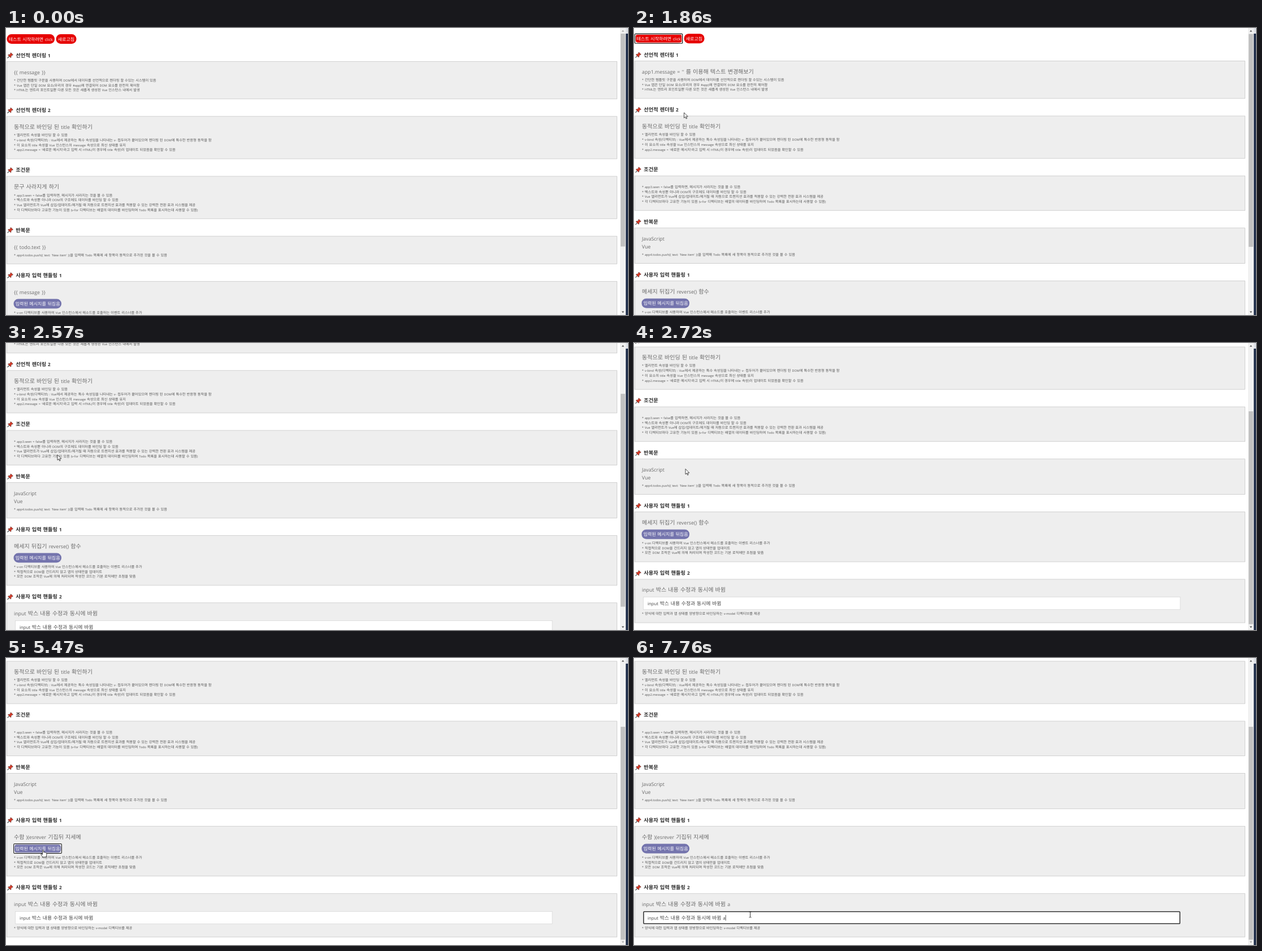
Write an HTML page that moves like this. It is 1100 px wide and 509 px high and loops after 7990 ms.

```html
<!DOCTYPE html>
<html lang="ko">
<head>
<meta charset="utf-8">
<title>Vue 연습</title>
<style>
  html, body { margin: 0; width: 100%; height: 100%; overflow: hidden; background: #fff; }
  svg { display: block; width: 1100px; height: 509px; }
  text {
    font-family: "Open Sans", "Noto Sans CJK KR", sans-serif;
    word-spacing: .1em; white-space: pre; text-rendering: geometricPrecision;
  }
  .ko { font-family: "Noto Sans CJK KR", sans-serif; font-size: 1.14em; }
  .title { font-size: 8.1px; font-weight: 700; fill: #2a2a2a; }
  .head { font-size: 8.8px; fill: #6a6a6a; }
  .note { font-size: 5.46px; fill: #555; }
  .btn { font-size: 7.05px; fill: #fff; }
  .field { font-size: 7.75px; fill: #444; }
  .box { fill: #eee; stroke: #c8c8c8; stroke-width: .8; }
  .ring { fill: none; stroke: #101010; stroke-width: 1.3; }
  .gap { fill: none; stroke: #fff; stroke-width: .9; }
  .pin { fill: #d93a28; stroke: #3a1512; stroke-width: .6; }
  .needle { stroke: #444; stroke-width: 1.1; }
  .cursor path { fill: #fff; stroke: #111; stroke-width: .75; stroke-linejoin: round; }
  .cursor .beam { fill: none; stroke: #222; stroke-width: .9; }
</style>
</head>
<body>
<svg viewBox="0 0 1100 509">
  <g id="page"></g>
  <rect x="1086" width="10" height="509" fill="#f1f1f1"/>
  <rect id="thumb" x="1087" y="10" width="8" height="377.5" fill="#c1c1c1"/>
  <path id="up" d="M1088.8 6.4L1091 3.8 1093.2 6.4Z"/>
  <path id="down" d="M1088.8 502.6L1091 505.2 1093.2 502.6Z"/>
  <rect x="1096" width="4" height="10" fill="#dfe2e8"/>
  <rect x="1096" y="10" width="4" height="499" fill="#26344f"/>
  <g id="cursor" class="cursor">
    <path id="arrow" d="M0 0V9.6L2.2 7.5 3.7 11 5.2 10.3 3.7 7H6.8Z"/>
    <path id="hand" d="M-1 1Q0 -.4 1 1V4.6Q2.2 3.9 3 5 4.3 4.4 5 5.6 6 5.2 6.3 6.5V9.5L5.2 13H-.8L-3.6 8.6Q-4 7.2 -2.6 7.4L-1 8.8Z"/>
    <path id="beam" class="beam" d="M-2 -5H-.6L0 -4.5 .6 -5H2M0 -4.5V4.5M-2 5H-.6L0 4.5 .6 5H2"/>
  </g>
</svg>
<script>
const LOOP = 7990;
const MAX_SCROLL = 151;
const $ = id => document.getElementById(id);
const show = (id, on) => { $(id).style.display = on ? '' : 'none'; };

// Hangul runs get their own, slightly larger face.
const mixed = s => s.replace(/[가-힣]+/g, run => `<tspan class="ko">${run}</tspan>`);
const lift = { title: 3.3, head: 3.5, note: 2.1, btn: 2.9, field: 2.9 };
const label = (cls, x, middle, s, id = '') =>
  `<text id="${id}" class="${cls}" x="${x}" y="${middle + lift[cls]}">${mixed(s)}</text>`;
const pill = (x, y, w, color, s) =>
  `<rect x="${x}" y="${y}" width="${w}" height="17" rx="8.2" fill="${color}"/>` +
  label('btn', x + 3.2, y + 8.7, s);
const focusRing = (id, x, y, w, h) =>
  `<g id="${id}"><rect class="ring" x="${x}" y="${y}" width="${w}" height="${h}" rx="1.2"/>` +
  `<rect class="gap" x="${x + 1.1}" y="${y + 1.1}" width="${w - 2.2}" height="${h - 2.2}"/></g>`;
const pin = y => `<g transform="translate(2 ${y - 5.3})"><path class="needle" d="M.5 10.5L4 7"/>` +
  '<path class="pin" d="M6.5 .8L10.3 4.6 9.6 5.3 8.8 5 6.9 7 7 9 6.2 9.6 1.6 5 2.3 4.2 4.2 4.3 6.2 2.4 5.9 1.5Z"/></g>';

const REVERSE = '메세지 뒤집기 reverse() 함수';
const TYPED = 'input 박스 내용 수정과 동시에 바뀜';
const sections = [
  { title: '선언적 렌더링 1', before: ['{{ message }}'], after: ["app1.message = '' 를 이용해 텍스트 변경해보기"],
    notes: ['간단한 템플릿 구문을 사용하여 DOM에서 데이터를 선언적으로 렌더링 할 수있는 시스템이 있음',
      'Vue 앱은 단일 DOM 요소(우리의 경우 #app)에 연결되어 DOM 요소를 완전히 제어함',
      'HTML는 엔트리 포인트일뿐 다른 모든 것은 새롭게 생성된 Vue 인스턴스 내에서 발생'] },
  { title: '선언적 렌더링 2', before: ['동적으로 바인딩 된 title 확인하기'], after: ['동적으로 바인딩 된 title 확인하기'],
    notes: ['엘리먼트 속성을 바인딩 할 수 있음',
      'v-bind 속성(디렉티브) : Vue에서 제공하는 특수 속성임을 나타내는 v- 접두어가 붙어있으며 렌더링 된 DOM에 특수한 반응형 동작을 함',
      '이 요소의 title 속성을 Vue 인스턴스의 message 속성으로 최신 상태를 유지',
      "app2.message = '새로운 메시지'라고 입력 시 HTML(이 경우에 title 속성)이 업데이트 되었음을 확인할 수 있음"] },
  { title: '조건문', before: ['문구 사라지게 하기'], after: [],
    notes: ['app3.seen = false를 입력하면, 메시지가 사라지는 것을 볼 수 있음',
      '텍스트와 속성뿐 아니라 DOM의 구조에도 데이터를 바인딩 할 수 있음',
      'Vue 엘리먼트가 Vue에 삽입/업데이트/제거될 때 자동으로 트랜지션 효과를 적용할 수 있는 강력한 전환 효과 시스템을 제공',
      '각 디렉티브마다 고유한 기능이 있음 (v-for 디렉티브는 배열의 데이터를 바인딩하여 Todo 목록을 표시하는데 사용할 수 있음)'] },
  { title: '반복문', before: ['{{ todo.text }}'], after: ['JavaScript', 'Vue'],
    notes: ["app4.todos.push({ text: 'New item' })을 입력해 Todo 목록에 새 항목이 동적으로 추가된 것을 볼 수 있음"] },
  { title: '사용자 입력 핸들링 1', before: ['{{ message }}'], after: [REVERSE], id: 'reversible', extra: 22,
    widget: (y, live) => pill(13.5, y + 31.2, 84.5, '#7474ad', '입력된 메시지를 뒤집음') +
      (live ? focusRing('flipFocus', 13.8, y + 31.4, 84.4, 16.6) : ''),
    notes: ['v-on 디렉티브를 사용하여 Vue 인스턴스에서 메소드를 호출하는 이벤트 리스너를 추가',
      '직접적으로 DOM을 건드리지 않고 앱의 상태만을 업데이트',
      '모든 DOM 조작은 Vue에 의해 처리되며 작성한 코드는 기본 로직에만 초점을 맞춤'] },
  { title: '사용자 입력 핸들링 2', before: ['{{ message }}'], after: [TYPED], id: 'echo', extra: 28,
    widget: (y, live) => `<rect x="16.5" y="${y + 31.6}" width="949.5" height="22.2" fill="#fff" stroke="#d4d4d4" stroke-width=".7"/>` +
      (live ? label('field', 24, y + 43.2, TYPED, 'field') +
        `<rect id="fieldFocus" class="ring" x="17" y="${y + 32.1}" width="948.4" height="21.2" rx="1.2"/>` +
        `<rect id="caret" y="${y + 38}" width=".7" height="10" fill="#111"/>` : ''),
    notes: ['양식에 대한 입력과 앱 상태를 양방향으로 바인딩하는 v-model 디렉티브를 제공'] }
];

function layout(live) {
  let y = 59.3, out = '';
  for (const s of sections) {
    const heads = live ? s.after : s.before;
    const extra = s.extra || 0;
    const height = 26.7 + 13.7 * heads.length + 8.7 * s.notes.length + extra;
    out += pin(y - 11) + label('title', 17.3, y - 11, s.title) +
      `<rect class="box" x="1.5" y="${y}" width="1079" height="${height}"/>`;
    heads.forEach((h, i) => out += label('head', 14, y + 18.8 + 13.7 * i, h, live && s.id || ''));
    if (s.widget) out += s.widget(y, live);
    s.notes.forEach((n, i) =>
      out += label('note', 14, y + 19.7 + 13.7 * heads.length + extra + 8.7 * i, '* ' + n));
    y += height + 31;
  }
  return out;
}

$('page').innerHTML =
  pill(1.5, 11, 84.5, '#e60000', '테스트 시작하려면 click') + pill(88.5, 11, 36, '#e60000', '새로고침') +
  focusRing('startFocus', 1.6, 11.2, 84, 16.8) +
  `<g id="before">${layout(false)}</g><g id="after">${layout(true)}</g>`;

// Step tables: [start time, value]
const scrollSteps = [[0, 0], [1860, .8], [1940, 18], [2010, 44], [2090, 57.3], [2480, 75],
  [2560, 108], [2640, 138], [2720, 149.8], [2800, MAX_SCROLL]];
const shapeSteps = [[0, ''], [70, 'arrow'], [910, 'hand'], [1330, 'arrow'], [3500, 'hand'],
  [5740, 'arrow'], [6000, 'beam']];
const path = [[70, 892, 464], [830, 52, 15], [1180, 52, 15], [1860, 88.5, 150], [1940, 88.5, 150],
  [2090, 90, 162], [2330, 90, 162], [2400, 91, 173], [2720, 91, 223.3], [3040, 92, 257],
  [3140, 92, 257], [3660, 64, 339.3], [3900, 64, 339.5], [4210, 64.5, 340], [4430, 66, 340.5],
  [5590, 65.5, 340], [6060, 120, 454], [6160, 120, 454], [6400, 196, 456], [7150, 205.5, 455]];
const CLICK = 1100, FIELD_CLICK = 6400, SPACE = 6920, LETTER = 7760;
const flips = [3820, 4580, 5290];

const stepAt = (steps, t) => steps.filter(s => s[0] <= t).pop()[1];

// The pointer advances in ticks of roughly 77 ms and slows down on arrival.
function pointerAt(t) {
  const i = path.findIndex(p => p[0] > t);
  if (i < 0) return path[path.length - 1].slice(1);
  if (i === 0) return path[0].slice(1);
  const [a, b] = [path[i - 1], path[i]];
  const span = b[0] - a[0];
  const ticks = Math.max(1, Math.round(span / 77));
  const p = Math.floor((t - a[0]) / span * ticks + 1e-6) / ticks;
  const e = span > 400 ? p * (2 - p) : p;
  return [a[1] + (b[1] - a[1]) * e, a[2] + (b[2] - a[2]) * e];
}

function setText(id, s) {
  const el = $(id);
  if (el.textContent !== s) el.innerHTML = mixed(s);
}

function draw(now) {
  const t = now % LOOP;
  const scroll = stepAt(scrollSteps, t);
  $('page').setAttribute('transform', `translate(0 ${-scroll})`);
  $('thumb').setAttribute('y', 10 + scroll * .742);
  $('up').setAttribute('fill', scroll > 0 ? '#505050' : '#a3a3a3');
  $('down').setAttribute('fill', scroll < MAX_SCROLL ? '#505050' : '#a3a3a3');

  const started = t >= CLICK;
  show('before', !started);
  show('after', started);
  show('startFocus', started && t < flips[0]);

  const flipped = flips.filter(f => f <= t).length % 2;
  setText('reversible', flipped ? [...REVERSE].reverse().join('') : REVERSE);
  show('flipFocus', t >= flips[0] && t < FIELD_CLICK);

  const typed = TYPED + (t >= SPACE ? ' ' : '') + (t >= LETTER ? 'a' : '');
  setText('field', typed);
  setText('echo', typed);
  const focused = t >= FIELD_CLICK;
  show('fieldFocus', focused);
  const lastKey = [FIELD_CLICK, SPACE, LETTER].filter(k => k <= t).pop();
  show('caret', focused && t - lastKey < 530);
  if (focused) $('caret').setAttribute('x', 24.2 + $('field').getComputedTextLength());

  const shape = stepAt(shapeSteps, t);
  for (const id of ['arrow', 'hand', 'beam']) show(id, id === shape);
  $('cursor').setAttribute('transform', `translate(${pointerAt(t)})`);
}

function frame() {
  draw(performance.now());
  requestAnimationFrame(frame);
}
frame();
</script>
</body>
</html>
```
